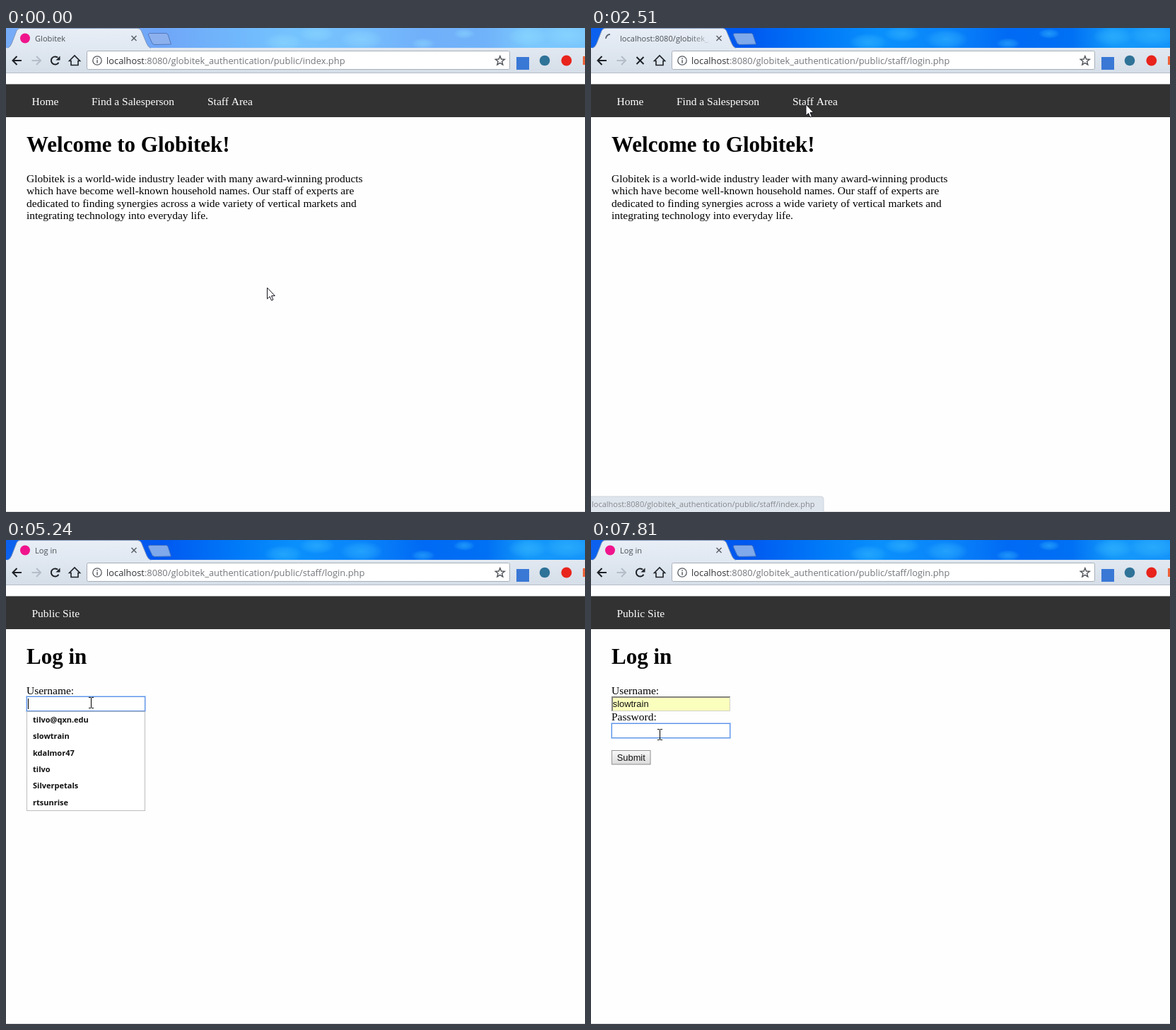
An HTML page with a canvas for the animation above (8 s loop, 819x684 px).

```html
<!DOCTYPE html>
<html lang="en">
<head>
<meta charset="utf-8">
<title>Login walkthrough</title>
<style>
  html, body { margin: 0; width: 100%; height: 100%; overflow: hidden; background: #fefefe; }
  canvas { display: block; }
</style>
</head>
<body>
<canvas id="stage" width="819" height="684"></canvas>
<script>
const c = document.getElementById('stage').getContext('2d');
const LOOP = 8000;
const UI = '"Open Sans", "Noto Sans", sans-serif';
const SERIF = '"Liberation Serif", serif';
const SANS = '"Liberation Sans", sans-serif';
const USERS = ['tilvo@qxn.edu', 'slowtrain', 'kdalmor47', 'tilvo', 'Silverpetals', 'rtsunrise'];
const ROW = 23.3, LIST_TOP = 242.5;

const T = { active: 2150, load: 2270, statusOff: 2870, loaded: 2990,
            focus: 4180, list: 4540, pick: 6710, next: 7320 };

// Pointer moves: first and last step, number of steps, control point, end point.
const START = [369.5, 367];
const MOVES = [
  [220, 330, 2, [335, 360], [304, 347]],
  [580, 1060, 5, [276, 262], [271, 280]],
  [1310, 2030, 7, [345, 200], [306, 109]],
  [2270, 2271, 1, [305, 108], [304, 108]],
  [2990, 3220, 3, [297, 110], [290, 113]],
  [3460, 4060, 6, [215, 165], [120.5, 230]],
  [5740, 6340, 6, [101, 270], [105.5, 287]],
  [6830, 7200, 4, [100, 285], [97.5, 275]]
];

function pointer(t) {
  let p = START;
  for (const [from, to, n, mid, end] of MOVES) {
    if (t < from) break;
    const k = Math.min(n, 1 + Math.floor((t - from) / (to - from) * (n - 1) + 0.01));
    const u = k / n, v = 1 - u, a = p;
    p = [0, 1].map(i => v * v * a[i] + 2 * u * v * mid[i] + u * u * end[i]);
    if (k < n) break;
  }
  return p;
}

function box(x, y, w, h, fill) {
  c.fillStyle = fill;
  c.fillRect(x, y, w, h);
}

function frame(x, y, w, h, color, width = 1) {
  c.strokeStyle = color;
  c.lineWidth = width;
  c.strokeRect(x, y, w, h);
}

function text(s, x, y, font, color) {
  c.font = font;
  c.fillStyle = color;
  c.fillText(s, x, y);
}

function poly(points, fill, stroke, width = 1, closed = true) {
  c.beginPath();
  points.forEach(([x, y]) => c.lineTo(x, y));
  if (closed) c.closePath();
  if (fill) { c.fillStyle = fill; c.fill(); }
  if (stroke) { c.strokeStyle = stroke; c.lineWidth = width; c.stroke(); }
}

function disc(x, y, r, color) {
  c.fillStyle = color;
  c.beginPath();
  c.arc(x, y, r, 0, 7);
  c.fill();
}

function arc(x, y, r, a, b, color, width) {
  c.strokeStyle = color;
  c.lineWidth = width;
  c.beginPath();
  c.arc(x, y, r, a, b);
  c.stroke();
}

function cross(x, y, r, color, width) {
  poly([[x - r, y - r], [x + r, y + r]], null, color, width, false);
  poly([[x + r, y - r], [x - r, y + r]], null, color, width, false);
}

function ramp(x0, y0, x1, y1, ...stops) {
  const g = c.createLinearGradient(x0, y0, x1, y1);
  stops.forEach(([at, color]) => g.addColorStop(at, color));
  return g;
}

// Light patches of the wallpaper: x, y, radius.
const CLOUDS = [[392, 20, 16], [440, 8, 15], [503, 16, 18], [590, 22, 10],
                [648, 8, 9], [738, 12, 17], [795, 10, 20]];

function sky(active) {
  box(0, 0, 819, 28, ramp(0, 0, 819, 0, [0, '#0c62ee'], [0.27, '#0058f0'], [0.4, '#007af8'],
    [0.5, '#0a90fc'], [0.62, '#0a84fa'], [0.72, '#006af4'], [0.83, '#0070f4'],
    [0.9, '#1498fa'], [1, '#1494fa']));
  c.save();
  c.beginPath();
  c.rect(0, 0, 819, 28);
  c.clip();
  for (const [x, y, r] of CLOUDS) {
    const g = c.createRadialGradient(0, 0, 0, 0, 0, r);
    g.addColorStop(0, 'rgba(60,190,255,.5)');
    g.addColorStop(0.6, 'rgba(60,190,255,.28)');
    g.addColorStop(1, 'rgba(60,190,255,0)');
    c.save();
    c.translate(x, y);
    c.scale(1.7, 0.8);
    disc(0, 0, r, g);
    c.restore();
  }
  c.restore();
  if (!active) box(0, 0, 819, 28, 'rgba(235,250,255,.48)');
}

function tab(t, loading) {
  poly([[203, 7.5], [227, 7.5], [229, 9], [233.5, 23], [210, 23.5], [207, 22], [201, 9]],
    t < T.active ? '#8db1ee' : '#7fa9ea', t < T.active ? '#5478bd' : '#3f70c4');
  c.beginPath();
  c.moveTo(2, 28.5);
  c.quadraticCurveTo(6, 27, 8, 22);
  c.lineTo(15, 4);
  c.quadraticCurveTo(16.5, 0.5, 20, 0.5);
  c.lineTo(186, 0.5);
  c.quadraticCurveTo(190, 0.5, 191.5, 4);
  c.lineTo(199, 22);
  c.quadraticCurveTo(201, 27, 205, 28.5);
  c.fillStyle = ramp(0, 0, 0, 28, [0, '#e9eef6'], [1, '#e0e8f1']);
  c.fill();
  c.strokeStyle = '#7f97bb';
  c.lineWidth = 1;
  c.stroke();

  if (loading) {
    const turn = -Math.floor((t - 2510) / 120 + 0.01) * 0.9;
    arc(27, 15, 6, Math.PI + turn, Math.PI * 1.5 + turn, '#5c6370', 1.8);
    text('localhost:8080/globitek_', 41, 18.5, '11.1px ' + UI,
      ramp(140, 0, 168, 0, [0, '#4c5056'], [1, 'rgba(76,80,86,.1)']));
  } else {
    disc(27, 14.5, 7, '#f0148c');
    text(t < T.loaded ? 'Globitek' : 'Log in', 41, 18.5, '11.1px ' + UI, '#4c5056');
  }
  cross(181, 14.5, 3.5, '#5a5f66', 1.4);
}

function arrowIcon(x, dir, color) {
  poly([[x - 6 * dir, 46], [x + 6.5 * dir, 46]], null, color, 2, false);
  poly([[x, 40], [x - 6 * dir, 46], [x, 52]], null, color, 2, false);
}

function toolbar(t, loading) {
  box(0, 28, 819, 36, ramp(0, 28, 0, 64, [0, '#e1e8f1'], [1, '#d5dee8']));
  box(0, 63, 819, 1, '#b5bdc7');
  const ink = '#1d2126';
  arrowIcon(15.5, 1, ink);
  arrowIcon(43, -1, '#b4bdc8');
  if (loading) {
    cross(69.5, 46, 5, ink, 2);
  } else {
    arc(69.5, 46, 5.6, 0.5, 5.4, ink, 2);
    poly([[76.5, 39.5], [76.5, 45.5], [70.5, 45.5]], ink);
  }
  poly([[89.5, 46.5], [97, 39], [104.5, 46.5], [102, 46.5], [102, 52.5], [92, 52.5], [92, 46.5]],
    null, ink, 1.6);

  c.beginPath();
  c.roundRect(114.5, 32.5, 598, 26, 2);
  c.fillStyle = '#fff';
  c.fill();
  c.strokeStyle = '#a7afb9';
  c.lineWidth = 1;
  c.stroke();
  arc(129, 46, 6.2, 0, 7, '#565a60', 1.3);
  box(128.3, 42.3, 1.5, 1.6, '#565a60');
  box(128.3, 45.2, 1.5, 4.4, '#565a60');

  const font = '12.87px ' + UI, page = t < T.load ? 'index.php' : 'staff/login.php';
  text('localhost', 142, 50.5, font, '#303236');
  const w = c.measureText('localhost').width;
  text(':8080/globitek_authentication/public/' + page, 142 + w, 50.5, font, '#74777c');

  const star = [];
  for (let i = 0; i < 10; i++) {
    const r = i % 2 ? 2.9 : 6.8, a = i * Math.PI / 5;
    star.push([698.8 + r * Math.sin(a), 46.4 - r * Math.cos(a)]);
  }
  poly(star, null, '#505459', 1.4);

  box(722, 41, 18, 18, '#3a78d6');
  disc(762, 46, 7.3, '#2f7398');
  disc(792.8, 46, 7.4, '#e8241c');
  box(816, 40, 3, 12, '#ee6238');
}

function home() {
  const font = '15.5px ' + SERIF;
  text('Home', 36.5, 109, font, '#fff');
  text('Find a Salesperson', 121, 109, font, '#fff');
  text('Staff Area', 285, 109, font, '#fff');
  text('Welcome to Globitek!', 29, 175, 'bold 31px ' + SERIF, '#000');
  ['Globitek is a world-wide industry leader with many award-winning products',
   'which have become well-known household names. Our staff of experts are',
   'dedicated to finding synergies across a wide variety of vertical markets and',
   'integrating technology into everyday life.'
  ].forEach((line, i) => text(line, 29, 217.5 + i * 17.5, font, '#000'));
}

function field(y, { focused, filled, value = '', selected, caret }) {
  box(29, y, 168, 21, filled ? '#faffbd' : '#fff');
  if (filled) {
    box(29, y, 168, 2, '#85857f');
    box(29, y, 2, 21, '#85857f');
    box(30, y + 20, 167, 1, '#d2d2c4');
    box(196, y + 1, 1, 20, '#d2d2c4');
  } else {
    frame(29.5, y + 0.5, 167, 20, '#a6a6a6');
  }
  if (focused) {
    frame(28.5, y - 0.5, 169, 22, 'rgba(77,144,254,.4)');
    frame(29.5, y + 0.5, 167, 20, '#5b91e2');
  }
  c.font = '12.9px ' + SANS;
  const w = c.measureText(value).width;
  if (selected) box(30.5, y + 3, w + 0.7, 15, '#338fff');
  text(value, 30.7, y + 14.7, c.font, selected ? '#fff' : '#111');
  if (caret) box(31 + w, y + 3, 1, 15, '#000');
}

function login(t, hover) {
  const font = '15.5px ' + SERIF;
  text('Public Site', 36.5, 109, font, '#fff');
  text('Log in', 29, 175, 'bold 31px ' + SERIF, '#000');
  text('Username:', 29, 217.5, font, '#000');
  text('Password:', 29, 255.3, font, '#000');

  const picked = t >= T.pick, preview = hover >= 0;
  const blink = t < 4780 || (t >= 5240 && t < 5740) || picked;
  const first = t >= T.focus && t < T.next;
  field(221, {
    focused: first, filled: picked || preview,
    value: picked ? USERS[1] : preview ? USERS[hover] : '',
    selected: preview, caret: first && blink && !preview
  });
  field(259, { focused: t >= T.next, caret: t >= T.next && t < 7810 });

  box(29, 297, 55.5, 20.5, ramp(0, 297, 0, 317, [0, '#f8f8f8'], [1, '#dcdcdc']));
  frame(29.5, 297.5, 54.5, 19.5, '#949494');
  text('Submit', 36.7, 311.7, '12.9px ' + SANS, '#111');

  if (t >= T.list && !picked) {
    box(29, 242, 168, 141, '#fff');
    if (preview) box(30, LIST_TOP + hover * ROW, 166, ROW, '#cbcbcb');
    frame(29.5, 242.5, 167, 140, '#bdbdbd');
    USERS.forEach((name, i) => text(name, 38, 258 + i * ROW, 'bold 11px ' + UI, '#111'));
  }
}

function status() {
  c.beginPath();
  c.roundRect(-4, 662, 333, 30, 4);
  c.fillStyle = '#dfe5ed';
  c.fill();
  c.strokeStyle = '#cdd4dd';
  c.lineWidth = 1;
  c.stroke();
  text('localhost:8080/globitek_authentication/public/staff/index.php', 1, 677, '11px ' + UI, '#84888e');
}

const shapes = {
  arrow() {
    poly([[0, 0], [0, 15.8], [3.6, 12.5], [6, 18], [8.4, 17], [6, 11.6], [10.8, 11.4]],
      '#fff', '#15151f', 1);
  },
  beam() {
    box(-0.5, -7, 1, 14, '#000');
    for (const y of [-8, 7]) {
      box(-3.5, y, 3, 1, '#000');
      box(0.5, y, 3, 1, '#000');
    }
  },
  hand() {
    c.beginPath();
    c.moveTo(-1.5, 11.5);
    c.lineTo(-1.5, 1.5);
    c.quadraticCurveTo(0, -1, 1.5, 1.5);
    c.lineTo(1.5, 6.2);
    c.quadraticCurveTo(3.5, 5, 4, 7);
    c.quadraticCurveTo(6, 6, 6.3, 8);
    c.quadraticCurveTo(8.3, 7.5, 8.5, 9.5);
    c.lineTo(8.3, 14);
    c.lineTo(6.8, 18.8);
    c.lineTo(-0.8, 18.8);
    c.lineTo(-5, 12);
    c.quadraticCurveTo(-4.5, 8.5, -1.5, 11.5);
    c.fillStyle = '#fff';
    c.fill();
    c.strokeStyle = '#15151f';
    c.lineWidth = 1;
    c.stroke();
    for (const x of [1.5, 4, 6.3]) box(x - 0.4, 7.5, 0.8, 3.5, '#15151f');
  }
};

function cursorKind(t, x, y, listOpen) {
  if (t < T.loaded) {
    if (y > 205 && y < 273) return 'beam';
    return y < 126 && t < T.load ? 'hand' : 'arrow';
  }
  const inUser = y > 221 && y < 242, inPass = !listOpen && y > 259 && y < 280;
  return x < 197 && (inUser || inPass) ? 'beam' : 'arrow';
}

function draw(t) {
  const loading = t >= T.load && t < T.loaded;
  const listOpen = t >= T.list && t < T.pick;
  const [x, y] = pointer(t);
  const hover = listOpen && y > LIST_TOP ? Math.min(1, Math.floor((y - LIST_TOP) / ROW)) : -1;

  box(0, 0, 819, 684, '#fefefe');
  sky(t >= T.active);
  toolbar(t, loading);
  tab(t, loading);
  box(0, 79.4, 819, 46.6, '#323232');
  if (t < T.loaded) home();
  else login(t, hover);
  box(0, 683, 819, 1, '#d9dce0');
  if (t >= T.active && t < T.statusOff) status();

  c.save();
  c.translate(x, y);
  shapes[cursorKind(t, x, y, listOpen)]();
  c.restore();
}

const begin = performance.now();
function tick() {
  draw((performance.now() - begin) % LOOP);
  requestAnimationFrame(tick);
}
tick();
</script>
</body>
</html>
```
